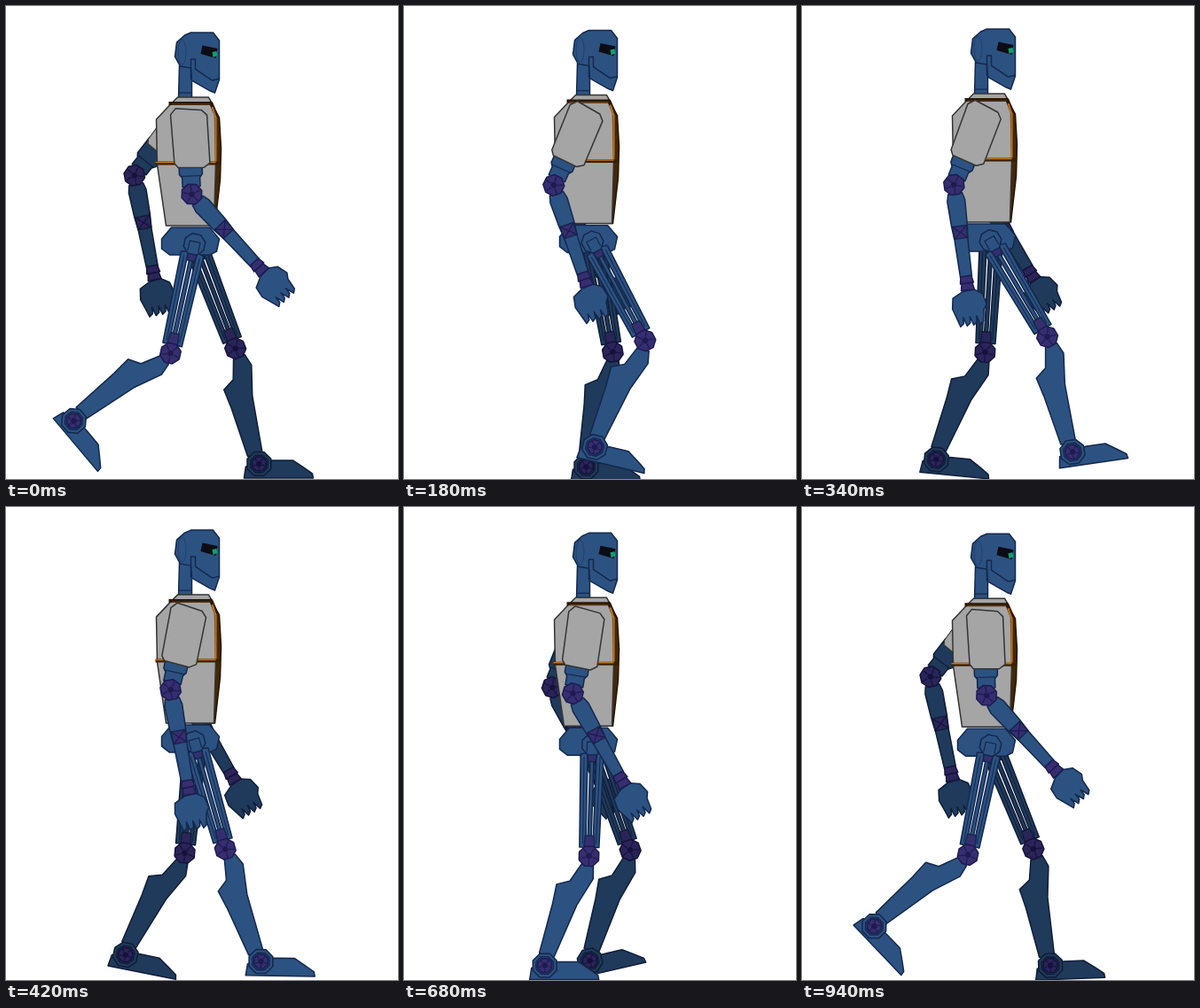
An HTML page with a canvas for the animation above (0.96 s loop, 442 px wide and 534 px high).

```html
<!DOCTYPE html>
<html lang="en">
<head>
<meta charset="utf-8">
<title>Walking robot</title>
<style>
  html, body { margin: 0; width: 100%; height: 100%; overflow: hidden; background: #fff; }
  canvas { display: block; }
</style>
</head>
<body>
<canvas id="stage" width="442" height="534"></canvas>
<script>
const ctx = document.getElementById('stage').getContext('2d');
const LOOP = 960, STEP = 20;
const THIGH = 126, CALF = 133, UPPER_ARM = 90.5;

const NEAR = { fill: '#2c5282', line: '#14284c', joint: '#352f70', mark: '#1f1a50' };
const FAR = { fill: '#1f3a5a', line: '#101d38', joint: '#2a2558', mark: '#16113c' };
const GREY = '#a5a5a5', GREY_LINE = '#343434', BROWN = '#452803', ORANGE = '#c27316';

// --- motion: angles in degrees from straight down, forward positive ---

const mix = (a, b, k) => a + (b - a) * k;

// Straight moves between [time, value] keys, wrapping at the loop's end.
function through(t, ...keys) {
  const i = keys.findLastIndex(([time]) => time <= t);
  const [t0, v0] = keys[i];
  const [t1, v1] = keys[i + 1] || [LOOP, keys[0][1]];
  return mix(v0, v1, (t - t0) / (t1 - t0));
}

// Soft pendulum from a to b, reaching b at the turn and then returning.
function swing(t, a, b, turn) {
  const k = t < turn ? t / turn : (LOOP - t) / (LOOP - turn);
  return mix(a, b, (1 - Math.cos(Math.PI * k)) / 2);
}

const bob = t => -1.2 + 2.3 * Math.cos((t - 850) / LOOP * 2 * Math.PI);

const nearLeg = t => ({
  thigh: through(t, [0, -12.4], [100, 17.4], [280, 41.5], [420, 16], [520, 16], [680, -1.8]),
  calf: through(t, [0, -55], [100, -46], [320, 11], [420, 17.6], [680, -22]),
  pitch: through(t, [0, 50], [100, 33], [290, -14], [430, 2], [680, 0])
});
const farLeg = t => ({
  thigh: through(t, [0, 21], [100, 21], [260, -1], [440, -6], [680, 19.3], [850, 27]),
  calf: through(t, [0, 11.6], [100, -7.3], [460, -33], [680, -20], [850, -6.5]),
  pitch: through(t, [0, 0], [260, 0], [500, 17], [680, -13], [850, -12])
});
const nearArm = t => ({
  upper: through(t, [0, 2.5], [100, -17.2], [265, -31], [420, -12.7], [680, -9.6]),
  fore: swing(t, 42.6, 7, 290)
});
const farArm = t => ({
  upper: swing(t, -38, 0, 350),
  fore: through(t, [0, 11], [100, 23], [260, 32], [680, 27])
});

function reach([x, y], angle, length) {
  const a = angle * Math.PI / 180;
  return [x + Math.sin(a) * length, y + Math.cos(a) * length];
}

// --- drawing helpers ---

function stroke(color, width = 1.5) {
  ctx.strokeStyle = color;
  ctx.lineWidth = width;
  ctx.stroke();
}

function trace(pts) {
  ctx.beginPath();
  for (let i = 0; i < pts.length; i += 2) ctx.lineTo(pts[i], pts[i + 1]);
}

function path(pts, color, width) {
  trace(pts);
  stroke(color, width);
}

function poly(pts, fill, line, width) {
  trace(pts);
  ctx.closePath();
  ctx.fillStyle = fill;
  ctx.fill();
  if (line) stroke(line, width);
}

// A symmetric shape along y, given as [y, half width] stations.
function limb(stations, fill, line) {
  const right = stations.flatMap(([y, w]) => [w, y]);
  const left = stations.toReversed().flatMap(([y, w]) => [-w, y]);
  poly([...right, ...left], fill, line);
}

function octagon(r, fill, line) {
  const pts = [];
  for (let a = Math.PI / 8; a < 2 * Math.PI; a += Math.PI / 4) pts.push(r * Math.cos(a), r * Math.sin(a));
  poly(pts, fill, line);
}

function gear(r, c) {
  octagon(r, c.joint, c.mark);
  for (let a = .3; a < 6; a += Math.PI * .4) {
    const x = Math.cos(a), y = Math.sin(a);
    path([x * 4, y * 4, x * r * .85, y * r * .85], c.mark, 1.2);
  }
  octagon(3.5, c.mark);
}

function at([x, y], turn, draw) {
  ctx.save();
  ctx.translate(x, y);
  ctx.rotate(turn * Math.PI / 180);
  draw();
  ctx.restore();
}

// --- body parts ---

function drawThigh(c) {
  for (const s of [-1, 1]) {
    poly([s * 5, 9, s * 13, 11, s * 11, 116, s * 4, 116], c.fill, c.line);
    path([s * 9, 14, s * 7.5, 112], c.line, 1);
  }
  limb([[10, 2], [104, 2]], c.fill, c.line);
  limb([[103, 5], [117, 6]], c.joint, c.line);
  limb([[8, 6], [19, 4]], c.joint, c.line);
  octagon(12.5, c.fill, c.line);
  path([-6, 8, -6, -3, 6, -3, 6, 8], c.line, 1.2);
}

function drawCalf(c) {
  poly([-4, 9, 9, 9, 14, 22, 8, 56, 6, 124, -11, 122, -18, 65, -22, 43, -9.5, 34], c.fill, c.line);
}

function drawFoot(c) {
  poly([-15, 3, -17, 16, 61, 16, 60, 11, 50, 4, 38, -4, 15, -4], c.fill, c.line);
  octagon(14.5, c.fill, c.line);
  octagon(10.5, c.fill, c.line);
  gear(8.5, c);
}

function drawLeg(hip, { thigh, calf, pitch }, c) {
  const knee = reach(hip, thigh, THIGH);
  const ankle = reach(knee, calf, CALF);
  at(knee, -calf, () => drawCalf(c));
  at(ankle, pitch, () => drawFoot(c));
  at(hip, -thigh, () => drawThigh(c));
  at(knee, -thigh, () => gear(12, c));
}

function drawHand(c) {
  const pts = [-18, 127, -6, 121, 7, 120, 16, 126, 19, 138, 15, 144];
  for (let x = 13; x > -16; x -= 7.5) pts.push(x, 157, x - 4, 160, x - 7, 150);
  poly([...pts, -20, 139], c.fill, c.line);
}

function drawForearm(c) {
  limb([[10, 8], [18, 10], [46, 9], [62, 7.5], [105, 6.5]], c.fill, c.line);
  limb([[47, 8], [61, 7.5]], c.joint, c.line);
  for (const s of [-1, 1]) path([s * 8, 47, s * -7.5, 61], c.mark, 1.2);
  drawHand(c);
  for (const y of [104, 112]) limb([[y, 6], [y + 8, 7.5]], c.joint, c.mark);
}

function drawArm(shoulder, { upper, fore }, c, sleeveX, sleeveY) {
  const elbow = reach(shoulder, upper, UPPER_ARM);
  at(shoulder, -upper, () => {
    limb([[46, 13], [68, 13], [72, 10], [82, 10]], c.fill, c.line);
    path([-11, 70, 11, 70], c.line, 1.2);
    ctx.scale(sleeveX, sleeveY);
    poly([-14, -7, 15, -4, 21, 2, 22, 56, 15, 61, -14, 60, -18, 55, -20, 0], GREY, GREY_LINE);
  });
  at(elbow, -fore, () => {
    drawForearm(c);
    gear(12, c);
  });
}

function drawHead({ fill, line }) {
  poly([195, 66, 209, 68, 209, 104, 194, 104], fill, line);
  path([194, 97, 209, 97], line, 1.2);
  poly([201, 32, 208, 29, 233, 29, 240, 38, 240, 82, 235, 97, 230, 95, 209, 83, 208, 69, 196, 67, 190, 56, 192, 40],
    fill, line);
  ctx.beginPath();
  ctx.ellipse(198, 51, 4.5, 14, 0, 0, 2 * Math.PI);
  stroke('#203f70', 1);
  path([208, 82, 208, 59, 213, 59, 213, 70, 232, 83, 240, 81], line);
  poly([221, 43.5, 238, 47, 236, 58, 219, 53], '#0c0d14');
  poly([232, 51, 237, 50, 238, 55, 233, 57], '#0fa068');
}

function drawTorso() {
  poly([193, 102, 228, 102, 232, 109, 186, 109], GREY, GREY_LINE);
  poly([230, 107, 240, 125, 242, 160, 241, 195, 235, 247, 230, 247], BROWN, '#241400');
  poly([185, 110, 230, 110, 235, 123, 236, 176, 234, 247, 180, 247, 170, 178, 169, 127], GREY, GREY_LINE);
  path([183, 109, 231, 109, 237, 123], '#2a1802', 4);
  path([186, 110, 230, 110], '#6b3f0a', 1);
  path([232, 113, 236, 125, 236, 176], ORANGE, 2);
  path([168, 176.5, 241, 176.5], '#382003', 4);
  path([168, 175.5, 236, 175.5], ORANGE, 1.5);
}

function drawPelvis({ fill, line }) {
  poly([186, 249, 229, 249, 240, 262, 237, 276, 229, 280, 184, 280, 175, 273, 175, 262], fill, line);
}

function render(t) {
  const dy = bob(t);
  ctx.fillStyle = '#fff';
  ctx.fillRect(0, 0, 442, 534);
  at([.5, dy + .5], 0, () => {
    drawArm([200, 119], farArm(t), FAR, .72, .88);
    drawLeg([213, 268], farLeg(t), FAR);
    drawPelvis(NEAR);
    drawHead(NEAR);
    drawTorso();
    drawLeg([212, 268], nearLeg(t), NEAR);
    drawArm([205, 121], nearArm(t), NEAR, 1, 1);
  });
}

ctx.lineJoin = 'round';
const start = performance.now();
function tick() {
  const t = (performance.now() - start) % LOOP;
  render(Math.floor(t / STEP) * STEP);
  requestAnimationFrame(tick);
}
tick();
</script>
</body>
</html>
```
